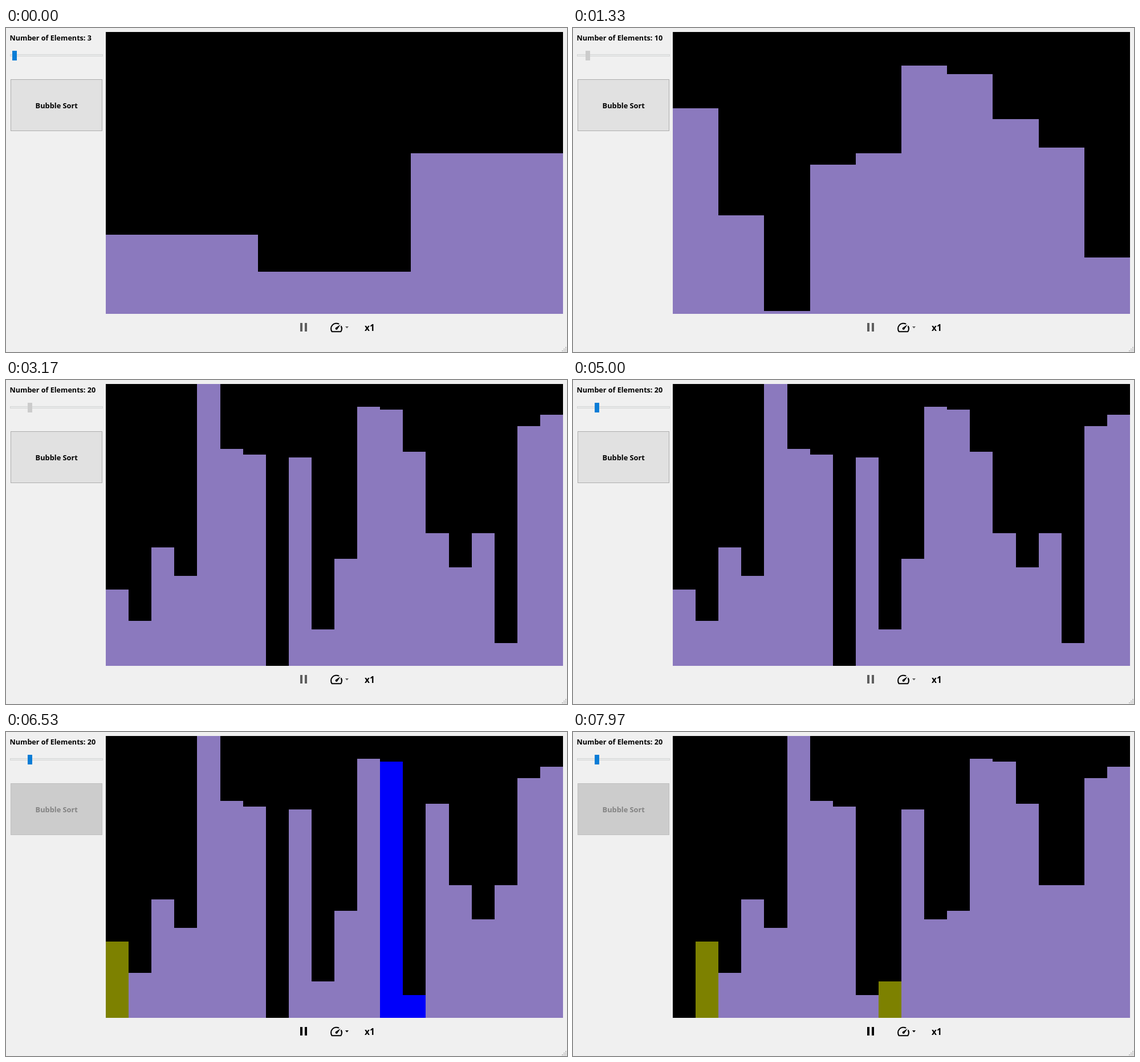
Recreate the animation shown at these times as an HTML page with a canvas. Size 984 by 569 pixels, loop 8000 ms.

```html
<!DOCTYPE html>
<html lang="en">
<head>
<meta charset="utf-8">
<title>Bubble sort visualizer</title>
<style>
  html, body { margin: 0; width: 100%; height: 100%; overflow: hidden; background: #f0f0f0; }
  canvas { display: block; }
</style>
</head>
<body>
<canvas id="stage" width="984" height="569"></canvas>
<script>
const ctx = document.getElementById('stage').getContext('2d');
const LOOP = 8000;
const SORT_START = 6098;
const STATE_TIME = 32;
const VIEW = { left: 175, right: 977, top: 7, bottom: 502 };
const PURPLE = '#8b79be', OLIVE = '#7d8100', BLUE = '#0000fa';

// Arrays on which the slider rests or lingers; others are seeded by length.
const presets = {
  3: [28, 15, 57],
  10: [73, 35, 1, 53, 57, 88, 85, 69, 59, 20],
  17: [20, 88, 71, 26, 48, 61, 75, 4, 7, 0, 26, 85, 81, 46, 16, 43, 63],
  20: [27, 16, 42, 32, 100, 77, 75, 0, 74, 13, 38, 92, 91, 76, 47, 35, 47, 8, 85, 89]
};

// Tracks: [time, value] pairs, linear in between.
const countTrack = [[930, 3], [1330, 10], [1600, 14], [1930, 14], [2070, 17], [2400, 24], [2770, 24], [3170, 20]];
const ACCENT = [10, 125, 214], DARK = [23, 23, 23], PRESSED = [204, 204, 204];
const handleTrack = [[30, ACCENT], [330, DARK], [430, DARK], [730, PRESSED],
  [3570, PRESSED], [3600, DARK], [4000, DARK], [4330, ACCENT]];
const faceTrack = [[5000, [225, 225, 225]], [5470, [229, 241, 251]], [6000, [229, 241, 251]],
  [6030, [204, 228, 247]], [SORT_START, [204, 228, 247]], [6400, [204, 204, 204]]];
const borderTrack = [[5000, [173, 173, 173]], [5470, [0, 120, 215]], [6000, [0, 120, 215]],
  [6030, [0, 84, 153]], [SORT_START, [0, 84, 153]], [6400, [191, 191, 191]]];

function sample(track, t) {
  const next = track.findIndex(key => key[0] > t);
  if (next === 0) return track[0][1];
  if (next < 0) return track[track.length - 1][1];
  const [t0, a] = track[next - 1], [t1, b] = track[next];
  const k = (t - t0) / (t1 - t0);
  return Array.isArray(a) ? a.map((v, i) => v + (b[i] - v) * k) : a + (b - a) * k;
}

const color = (track, t) => `rgb(${sample(track, t).map(Math.round).join(',')})`;

function randomBars(n) {
  let seed = n * 7919;
  return Array.from({ length: n }, () => {
    seed = (seed * 1103515245 + 12345) % 2147483648;
    return Math.floor(seed / 2147483648 * 101);
  });
}

// Each comparison yields two states: the candidate, then the swapping pair.
function sortStates(source) {
  const bars = source.slice(), states = [];
  const push = (i, extra) => states.push({ bars: bars.slice(), marks: { [i]: OLIVE, ...extra } });
  for (let i = 0; i < bars.length - 1; i++) {
    for (let j = bars.length - 1; j > i; j--) {
      push(i, { [j]: OLIVE });
      if (bars[j] < bars[j - 1]) {
        push(i, { [j]: BLUE, [j - 1]: BLUE });
        [bars[j - 1], bars[j]] = [bars[j], bars[j - 1]];
      } else {
        push(i, {});
      }
    }
  }
  return states;
}

const states = sortStates(presets[20]);

function rect(x, y, w, h, fill) {
  ctx.fillStyle = fill;
  ctx.fillRect(x, y, w, h);
}

function text(string, x, y, size, fill = '#000', align = 'left') {
  ctx.font = `bold ${size}px "Open Sans", "Noto Sans", sans-serif`;
  ctx.textAlign = align;
  ctx.fillStyle = fill;
  ctx.fillText(string, x, y);
}

function drawBars(bars, marks) {
  const { left, right, top, bottom } = VIEW;
  rect(left, top, right - left, bottom - top, '#000');
  const edge = i => Math.round(left + i * (right - left) / bars.length);
  bars.forEach((value, i) => {
    const y = Math.round(bottom - value * (bottom - top) / 100);
    rect(edge(i), y, edge(i + 1) - edge(i), bottom - y, marks[i] || PURPLE);
  });
}

function drawSlider(count, t) {
  rect(7, 46, 163, 4, '#d6d6d6');
  rect(8, 47, 161, 2, '#e7eaea');
  rect(Math.round(11.3 + (count - 3) * 1.57), 40, 8, 17, color(handleTrack, t));
}

function drawButton(t, sorting) {
  rect(8, 90, 161, 91, color(borderTrack, t));
  rect(9, 91, 159, 89, color(faceTrack, t));
  text('Bubble Sort', 88.7, 140.5, 12.8, sorting ? '#838383' : '#000', 'center');
}

const dial = new Path2D('M16.5 6.2A9 9 0 0 0 4.5 19H19.5A9 9 0 0 0 19.8 9.5');
const needle = new Path2D('M19.1 6.9L10.6 12.6A2 2 0 0 0 13.4 15.4Z');
const arrow = new Path2D('M595 524H601L598 527.5Z');

function drawControls(sorting) {
  const pauseColor = sorting ? '#000' : '#5f5f5f';
  rect(516, 518, 4, 15, pauseColor);
  rect(524, 518, 4, 15, pauseColor);

  ctx.save();
  ctx.translate(567, 513.5);
  ctx.scale(1.04, 1.04);
  ctx.strokeStyle = ctx.fillStyle = '#000';
  ctx.lineWidth = 2;
  ctx.lineJoin = 'round';
  ctx.stroke(dial);
  ctx.fill(needle);
  ctx.restore();
  ctx.fill(arrow);

  text('x1', 629, 532, 15.5);
  for (let row = 0; row < 3; row++)
    for (let col = 0; col <= row; col++)
      rect(981 - col * 3, 560 + row * 3, 2, 2, '#bfbfbf');
}

function draw(t) {
  const sorting = t >= SORT_START;
  const count = Math.round(sample(countTrack, t));
  const { bars, marks } = sorting
    ? states[Math.floor((t - SORT_START) / STATE_TIME)]
    : { bars: presets[count] || randomBars(count), marks: {} };

  rect(0, 0, 984, 569, '#f0f0f0');
  text(`Number of Elements: ${count}`, 6.5, 21.5, 12.6);
  drawSlider(count, t);
  drawButton(t, sorting);
  drawBars(bars, marks);
  drawControls(sorting);
}

const start = performance.now();
function tick() {
  draw((performance.now() - start) % LOOP);
  requestAnimationFrame(tick);
}
tick();
</script>
</body>
</html>
```
